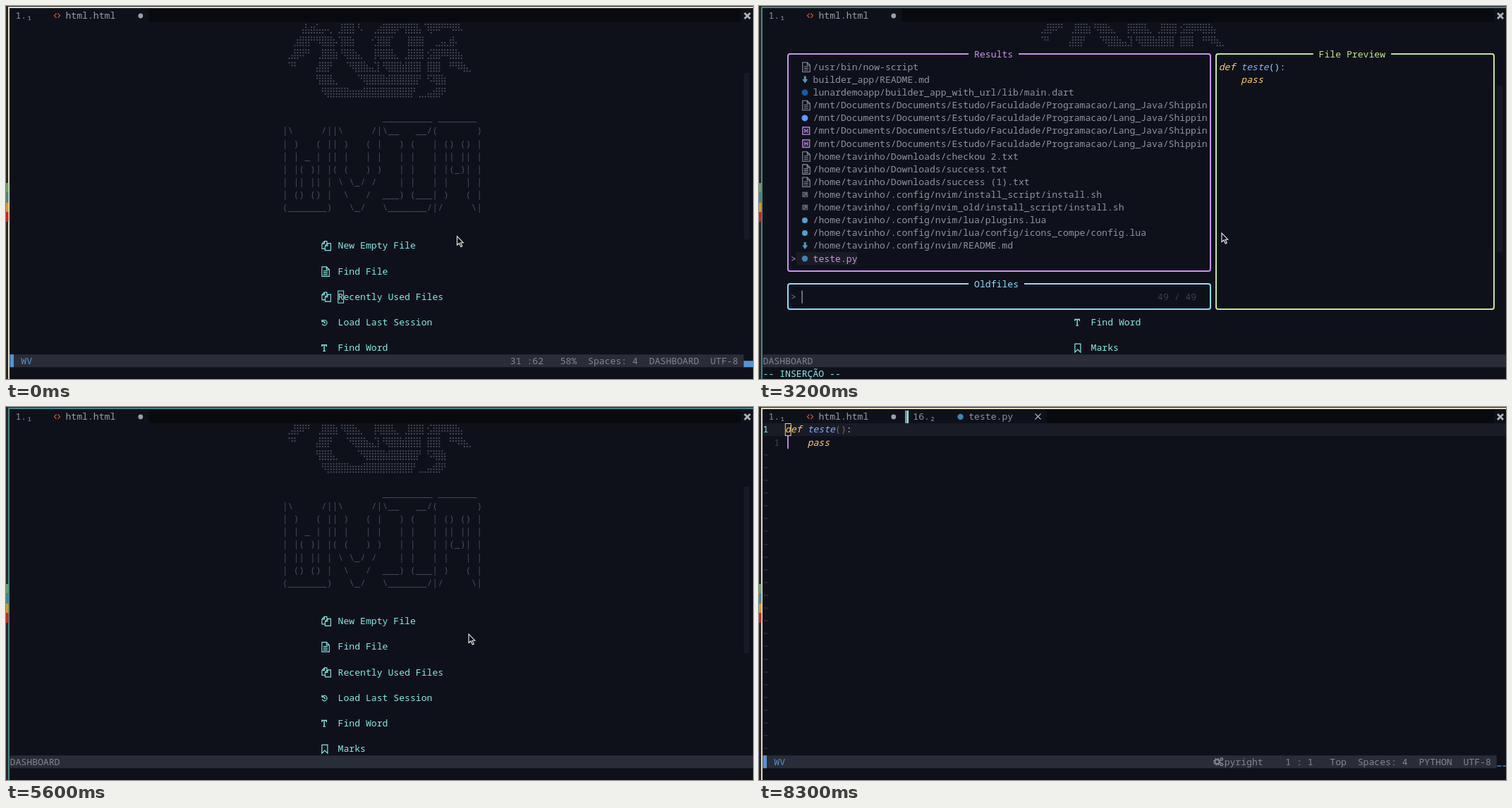
Recreate the animation shown at these times as an HTML page. Size 1059 by 529 pixels, loop 8.4 s.

```html
<!DOCTYPE html>
<html lang="en">
<head>
<meta charset="utf-8">
<title>Editor dashboard</title>
<style>
html, body { margin: 0; height: 100%; overflow: hidden; background: #0f111a; }
svg { display: block; width: 1059px; height: 529px; }
text { font: 13.13px "Noto Sans Mono", "DejaVu Sans Mono", monospace; white-space: pre; }
.i { font-style: italic; }
</style>
</head>
<body>
<svg id="stage" viewBox="0 0 1059 529"></svg>
<script>
const LOOP = 8400, CW = 7.88, RH = 18.12;
const BG = '#0f111a', DARK = '#080a0e', FG = '#8f93a2', DIM = '#3b3f51', ART = '#464a59', LINE = '#1a1c25',
  BAR = '#292d38', BARTEXT = '#84878d', MINT = '#80ece4', BLUE = '#5294d6', CYAN = '#89ddff',
  YELLOW = '#ffcb6b', FUNC = '#82aaff', PURPLE = '#c792ea', GREEN = '#c3e88d';

// Terminal grid to pixels
const X = c => 5.6 + CW * c, Y = r => 4.9 + RH * r, mid = r => Y(r) + RH / 2;

const box = (x, y, w, h, fill, more = '') => `<rect x="${x}" y="${y}" width="${w}" height="${h}" fill="${fill}" ${more}/>`;
const cells = (c, r, w, h, fill) => box(X(c), Y(r), CW * w, RH * h, fill);
const text = (c, r, s, fill, more = '') =>
  `<text x="${X(c)}" y="${Y(r) + 13.4}" fill="${fill}" ${more}>${s.replace(/</g, '&lt;')}</text>`;
const ital = (c, r, s, fill) => text(c, r, s, fill, 'class="i"');
const stroke = (d, color, w = 1.1) => `<path d="${d}" fill="none" stroke="${color}" stroke-width="${w}"/>`;
const dot = (color, r = 4.5) => `<circle cx="4.2" r="${r}" fill="${color}"/>`;
const at = (c, r, icon) => `<g transform="translate(${X(c)} ${mid(r)})">${icon}</g>`;

const doc = color => stroke('M1-6.500h6.500l4 4v9.500h-10.500zM7.500-6.500v4h4M3-.5h6M3 2h6M3 4.500h6', color);
const icons = {
  doc: doc(FG),
  md: '<path d="M3-5h3v4.500h2.500l-4 5.500l-4-5.500h2.500z" fill="#519aba"/>',
  dart: dot('#0b62a3'),
  cs: dot('#599eff'),
  lua: dot('#51a0cf', 4),
  py: dot('#3f82b5', 4.2),
  h: stroke('M1.200-5.200h9.600v10.400h-9.600zM4.300-3v6M7.700-3v6M4.300 0h3.400', '#a074c4', 1.7),
  sh: box(.5, -4, 8, 7.5, '#5d616b') + stroke('M2-2l1.500 1.500l-1.500 1.500M4.500 1.800h2.500', BG, 1),
  files: stroke('M8-3.500v-3h-3.500l-3.500 3.500v7h4M4.500-6.500v3.500h-3.500M9-3.500h4.500v10h-8v-6.500zM9-3.500v3.500h-3.500', MINT),
  page: doc(MINT),
  session: stroke('M1-4v2.800h2.800M1.200-1.200A3.700 3.700 0 1 1 1.200 2M4.500-1.500v2h1.800', MINT),
  word: stroke('M1-2v-2.300h6.500v2.300M4.250-4.300v8.600M2.500 4.300h3.500', MINT, 1.4),
  mark: stroke('M1-6h8v12l-4-4l-4 4z', MINT, 1.2),
  gears: `<g fill="none" stroke="${BARTEXT}"><circle cx="5.5" r="3.1" stroke-width="2"/>` +
    '<circle cx="5.5" r="4.7" stroke-width="1.6" stroke-dasharray="1.85"/>' +
    [-3.8, 3.8].map(y => `<circle cx="12" cy="${y}" r="1.7" stroke-width="1.5"/>`).join('') + '</g>'
};

// Dashboard art
const hydra = [
  '   ⢠⣧⣶⣥⡤⢄ ⣸⣿⣿⠘⠄ ⢀⣴⣿⣿⡿⠛⣿⣿⣧⠈⢿⠿⠟⠛⠻⠿⠄',
  '  ⣰⣿⣿⠛⠻⣿⣿⡦⢹⣿⣷   ⢊⣿⣿⡏  ⢸⣿⣿⡇ ⢀⣠⣄⣾⠄',
  ' ⣠⣿⠿⠛ ⢀⣿⣿⣷⠘⢿⣿⣦⡀ ⢸⢿⣿⣿⣄ ⣸⣿⣿⡇⣪⣿⡿⠿⣿⣷⡄',
  ' ⠙⠃   ⣼⣿⡟  ⠈⠻⣿⣿⣦⣌⡇⠻⣿⣿⣷⣿⣿⣿ ⣿⣿⡇ ⠛⠻⢷⣄',
  '      ⢻⣿⣿⣄   ⠈⠻⣿⣿⣿⣷⣿⣿⣿⣿⣿⡟ ⠫⢿⣿⡆',
  '       ⠻⣿⣿⣿⣿⣶⣶⣾⣿⣿⣿⣿⣿⣿⣿⣿⡟⢀⣀⣤⣾⡿⠃'
];
const banner = String.raw`
                  _________ _______
|\     /||\     /|\__   __/(       )
| )   ( || )   ( |   ) (   | () () |
| | _ | || |   | |   | |   | || || |
| |( )| |( (   ) )   | |   | |(_)| |
| || || | \ \_/ /    | |   | |   | |
| () () |  \   /  ___) (___| )   ( |
(_______)   \_/   \_______/|/     \|`.split('\n').slice(1);
const menu = [['files', 'New Empty File'], ['page', 'Find File'], ['files', 'Recently Used Files'],
  ['session', 'Load Last Session'], ['word', 'Find Word'], ['mark', 'Marks']];

// Braille bits 0-5 run down the two columns, 6 and 7 form the bottom row
function braille(lines, col, row) {
  const pitch = CW / 2;
  let d = '';
  lines.forEach((line, r) => [...line].forEach((ch, c) => {
    const bits = ch === ' ' ? 0 : ch.charCodeAt(0) - 0x2800;
    for (let b = 0; b < 8; b++) if (bits >> b & 1) {
      const dx = b < 6 ? b / 3 | 0 : b - 6, dy = b < 6 ? b % 3 : 3;
      d += `M${(X(col + c) + (dx + .5) * pitch).toFixed(1)} ${(mid(row + r) + (dy - 1.5) * pitch).toFixed(1)}h0`;
    }
  }));
  return `<path d="${d}" stroke="${ART}" stroke-width="2.3" stroke-linecap="round"/>`;
}
const dashboard = braille(hydra, 49, 1) +
  banner.map((s, i) => text(49, 8 + i, s, ART)).join('') +
  menu.map(([icon, s], i) => at(56, 18 + 2 * i, icons[icon]) + text(59, 18 + 2 * i, s, MINT)).join('');

// Picker
const job = '/mnt/Documents/Documents/Estudo/Faculdade/Programacao/Lang_Java/Shippin';
const home = '/home/tavinho/';
const results = [['doc', '/usr/bin/now-script'], ['md', 'builder_app/README.md'],
  ['dart', 'lunardemoapp/builder_app_with_url/lib/main.dart'],
  ['doc', job], ['cs', job], ['h', job], ['h', job],
  ['doc', home + 'Downloads/checkou 2.txt'], ['doc', home + 'Downloads/success.txt'],
  ['doc', home + 'Downloads/success (1).txt'],
  ['sh', home + '.config/nvim/install_script/install.sh'],
  ['sh', home + '.config/nvim_old/install_script/install.sh'],
  ['lua', home + '.config/nvim/lua/plugins.lua'],
  ['lua', home + '.config/nvim/lua/config/icons_compe/config.lua'],
  ['md', home + '.config/nvim/README.md'], ['py', 'teste.py']];

function panel(c1, r1, c2, r2, titleCol, title, color) {
  const [x1, x2] = [c1, c2].map(c => Math.round(X(c + .5)));
  const [y1, y2] = [r1, r2].map(r => Math.floor(mid(r)));
  return box(x1, y1, x2 - x1, y2 - y1, 'none', `rx="3" stroke="${color}" stroke-width="2"`) +
    cells(titleCol - 1, r1, title.length + 2, 1, BG) + text(titleCol, r1, title, color);
}
function picker(selected) {
  return cells(4, 3, 128, 21, BG) +
    panel(4, 3, 80, 20, 38, 'Results', PURPLE) +
    panel(4, 21, 80, 23, 38, 'Oldfiles', CYAN) +
    panel(81, 3, 131, 23, 100, 'File Preview', GREEN) +
    results.map(([icon, s], i) => {
      const r = 4 + i, on = i === selected;
      return (on ? cells(6, r, 3 + s.length, 1, LINE) + text(5, r, '>', PURPLE) : '') +
        at(7, r, icons[icon]) + text(9, r, s, on ? PURPLE : FG);
    }).join('') +
    ital(82, 4, 'def', YELLOW) + ital(86, 4, 'teste', FUNC) + text(91, 4, '():', CYAN) + ital(86, 5, 'pass', YELLOW) +
    text(5, 22, '>', '#5f7cb8') + box(60.5, Y(22), 1.2, RH, '#a6abb8') + text(71, 22, '49 / 49', DIM);
}

function blockCursor(c, r, color, focused, ch = '', more = '') {
  return focused ? cells(c, r, 1, 1, color) + text(c, r, ch, BG, more)
    : box(X(c) + .2, Y(r) + .5, CW, RH - 1, 'none', `stroke="${color}"`);
}

function tabs(second) {
  const end = X(second ? 51 : 25);
  return box(end, 4, X(131.5) - end, RH + .9, DARK) +
    text(1, 0, '1.₁', FG) + stroke('M71.500 10.500l-3 3.200l3 3.200M73.500 10.500l3 3.200l-3 3.200', '#d4552f', 1.2) +
    text(10, 0, 'html.html', '#9b9ea8') + `<circle cx="190.8" cy="14" r="3.4" fill="#9b9ea8"/>` +
    stroke('M1047 10l8 8m0-8l-8 8', '#b0b3ba', 2.8) +
    (second ? box(207, 5, 2.5, RH, '#8c909a') + box(209.5, 5, 2.5, RH, MINT) +
      text(27, 0, '16.₂', FG) + at(35, 0, icons.py) + text(37, 0, 'teste.py', FG) +
      stroke('M391.500 9.500l8 8m0-8l-8 8', '#a9adb6', 1.2) : '');
}

const bar = (...parts) => cells(0, 27, 132, 1, BAR) + box(5.6, Y(27), 5.4, RH, BLUE) + text(2, 27, 'WV', BLUE) +
  parts.map(([c, s]) => text(c, 27, s, BARTEXT)).join('') + text(126, 27, 'UTF-8', BARTEXT);

function dashboardView(t, focused) {
  const line = t < 1500 ? 31 : t < 1600 ? 27 : t < 1800 ? 31 : t < 2100 ? 33 : 31;
  const scroll = t < 1800 ? 0 : 2, total = 53;
  let out = `<g clip-path="url(#body)"><g transform="translate(0 ${-scroll * RH})">${dashboard}</g></g>` +
    box(1046, 95 + scroll * 9, 8, 236, '#171924');
  if (t < 3200) {
    const level = RH * (Math.floor(line / total * 9) - 1) / 8;
    out += blockCursor(59, line - 9 - scroll, MINT, focused, menu[(line - 27) / 2][1][0]) +
      bar([90, line + ' :62'], [99, Math.round(line / total * 100) + '%'], [104, 'Spaces: 4'], [115, 'DASHBOARD']) +
      box(X(132), Y(28) - level, 16, level, BLUE);
  } else {
    out += cells(0, 27, 134, 1, BAR) + text(0, 27, 'DASHBOARD', BARTEXT);
    if (t < 5600) out += picker(t >= 4100 && t < 4400 ? 14 : 15) + text(0, 28, '-- INSERÇÃO --', MINT);
    else if (t >= 6000) out += blockCursor(7, 22, FG, true);
  }
  return out;
}

function editorView(t, focused) {
  const lsp = t < 6300 ? [77, 'No Active Lsp'] : [83, 'pyright'];
  let out = cells(0, 1, 134, 1, LINE) + text(0, 1, '1', MINT) + text(2, 2, '1', DIM) +
    box(40, Y(2), 2, RH, '#b884d6') +
    ital(4, 1, 'def', YELLOW) + ital(8, 1, 'teste', FUNC) + text(13, 1, '()', '#7b6675') + text(15, 1, ':', CYAN) +
    ital(8, 2, 'pass', YELLOW) + blockCursor(4, 1, YELLOW, focused, 'd', 'class="i"');
  for (let r = 3; r < 27; r++) out += text(0, r, '~', DIM);
  return out + bar(lsp, [94, '1 : 1'], [102, 'Top'], [107, 'Spaces: 4'], [118, 'PYTHON']) +
    at(lsp[0] - 2, 27, icons.gears) + box(1046.5, 508.5, 6, 1.3, BLUE) + box(1054.4, 508.5, 6, 1.3, BLUE);
}

function pointer(t) {
  if (t >= 7400) return '';
  const k = Math.min(3, Math.max(0, Math.floor(t / 100) - 4)) / 3;
  const [x, y] = t >= 6900 ? [427, 222] : [639.5 + 16.5 * k, 326.5 - 4.5 * k];
  return `<path transform="translate(${x} ${y})" d="M0 0v12.500l3-2.500l2.300 5l2-1l-2.300-4.800h3.800z"
    fill="#0a0a0c" stroke="#f0f0f0" stroke-width="1.1"/>`;
}

function picture(t) {
  const focused = t >= 300 && t < 8300, editing = t >= 6200;
  return `<clipPath id="body">${box(0, Y(1), 1059, RH * 26, BG)}</clipPath>` +
    box(0, 0, 1059, 529, '#282726') +
    box(4, 2, 1070, 540, BG, `stroke="${focused ? '#458588' : '#e4dcc4'}" stroke-width="2"`) +
    ['#689d6a', '#458588', '#d79921', '#cc241d'].map((c, i) => box(0, 251 + i * 13.75, 3.4, 13.75, c)).join('') +
    tabs(editing) + (editing ? editorView : dashboardView)(t, focused) + pointer(t);
}

const stage = document.getElementById('stage');
let shown = '';
function tick() {
  const next = picture(performance.now() % LOOP);
  if (next !== shown) stage.innerHTML = shown = next;
  requestAnimationFrame(tick);
}
tick();
</script>
</body>
</html>
```
